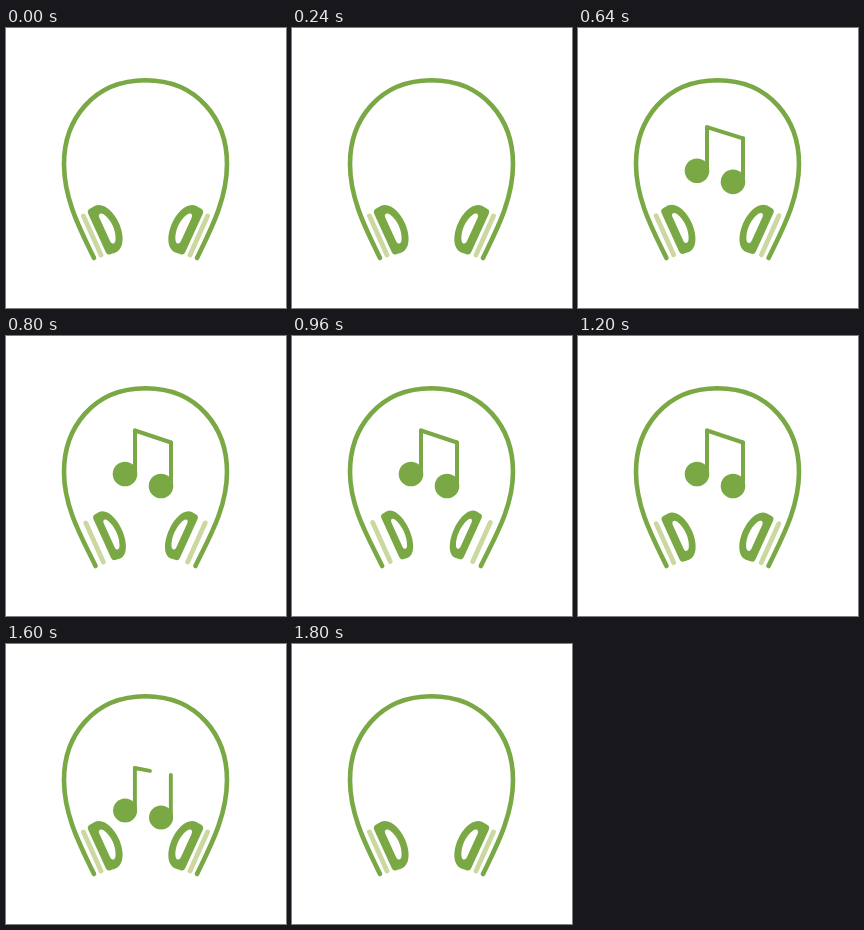
Recreate the animation shown at these times as an HTML page. Size 280 by 280 pixels, loop 1.88 s.

```html
<!DOCTYPE html>
<html lang="en">
<head>
<meta charset="utf-8">
<title>Headphones</title>
<style>
  html, body { margin: 0; width: 100%; height: 100%; overflow: hidden; background: #fff; }
  svg { display: block; width: 100vw; height: 100vh; }
</style>
</head>
<body>
<svg viewBox="0 0 280 280">
  <defs>
    <g id="side">
      <path id="band" fill="none" stroke="#79a845" stroke-width="4.6" stroke-linecap="round"/>
      <path id="pad" d="M77.5 188 L95 227" stroke="#cbd8a0" stroke-width="4.8" stroke-linecap="round"/>
      <g id="cup">
        <path fill="#79a845" d="M0 -21 Q0 -25 4 -25 L9 -25.5 C19 -25.5 24 -12 24 0 S19 25.5 9 25.5 L4 25 Q0 25 0 21 Z"/>
        <path fill="#fff" d="M8.5 -13 C8.5 -17 12 -17.5 14 -14 C18.5 -6 18.5 6 14 14 C12 17.5 8.5 17 8.5 13 Z"/>
      </g>
    </g>
  </defs>
  <use href="#side"/>
  <use href="#side" transform="translate(279 0) scale(-1 1)"/>
  <g fill="#79a845" stroke="#79a845" stroke-linecap="round" stroke-linejoin="round">
    <g class="note"><circle r="12.3" stroke="none"/><path d="M10 0 V-43.5" stroke-width="4"/></g>
    <g class="note"><circle r="12.3" stroke="none"/><path d="M10 0 V-43.5" stroke-width="4"/></g>
    <path id="beam" fill="none" stroke-width="4"/>
  </g>
</svg>
<script>
const LOOP = 1880;
const byId = id => document.getElementById(id);
const noteNodes = document.querySelectorAll('.note');
const notes = [
  { x: 119, y: 138, rise: 57, drift: 5 },
  { x: 155, y: 150, rise: 47, drift: 3 }
];

const ramp = (t, from, to) => Math.min(1, Math.max(0, (t - from) / (to - from)));
const smooth = u => u * u * (3 - 2 * u);
const easeOut = u => 1 - (1 - u) ** 2;

function drawPhones(t) {
  const held = t > 1040 && t < 1200 ? 1040 : t;
  const squeeze = 8.2 * Math.exp(-(((held - 930) / 223) ** 2));
  const shift = squeeze * 0.27;
  byId('band').setAttribute('d',
    `M${88 + shift} 230 C${75 + shift} 203 58 172 58 136 C58 92 87 52.3 139.5 52.3`);
  byId('pad').setAttribute('transform', `translate(${squeeze * 0.4} ${-squeeze * 0.18})`);
  byId('cup').setAttribute('transform',
    `translate(91 205) rotate(-24.5) translate(${squeeze} 0) scale(${1 - squeeze * 0.018} 1)`);
}

function drawNotes(t) {
  // The exit replays the entrance backwards.
  const time = t < 1440 ? t : 700 - 340 * ramp(t, 1440, 1760);
  const lift = smooth(ramp(time, 360, 700));
  const size = easeOut(ramp(time, 360, 560));
  const tips = notes.map((note, i) => {
    const x = note.x + note.drift * (1 - size);
    const y = note.y + note.rise * (1 - lift);
    noteNodes[i].setAttribute('transform', `translate(${x} ${y}) scale(${size})`);
    noteNodes[i].setAttribute('visibility', size > 0 ? 'visible' : 'hidden');
    return { x: x + 10 * size, y: y - 43.5 * size };
  });
  const reach = ramp(time, 480, 600);
  const [a, b] = tips;
  byId('beam').setAttribute('d', reach > 0
    ? `M${a.x} ${a.y} L${a.x + (b.x - a.x) * reach} ${a.y + (b.y - a.y) * reach}`
    : '');
}

const start = performance.now();
function frame() {
  const elapsed = (performance.now() - start) % LOOP;
  const t = Math.floor(elapsed / 40) * 40;
  drawPhones(t);
  drawNotes(t);
  requestAnimationFrame(frame);
}
frame();
</script>
</body>
</html>
```
